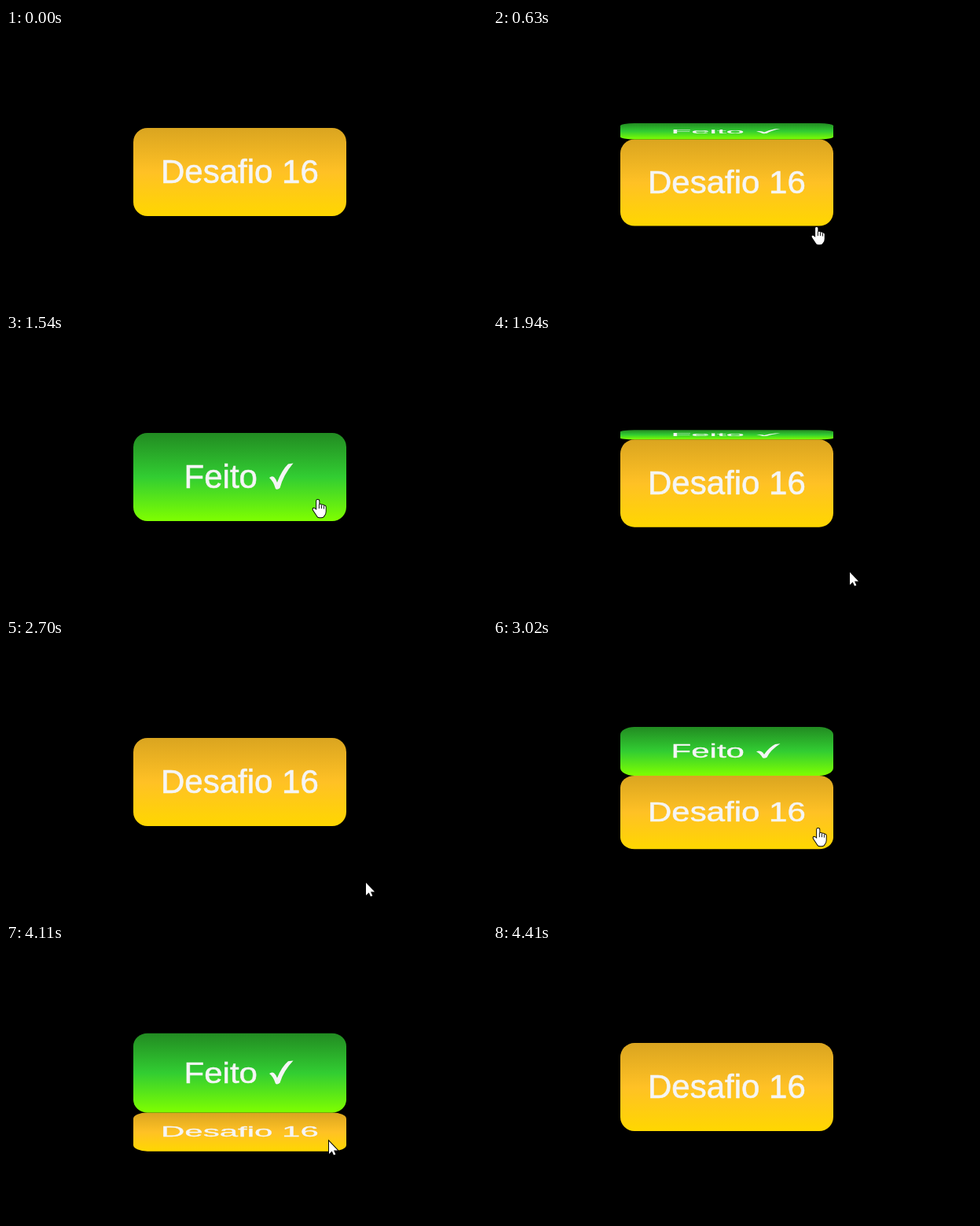
An HTML page with a canvas for the animation above (4.72 s loop, 612 by 352 pixels).

```html
<!DOCTYPE html>
<html lang="pt">
<head>
<meta charset="utf-8">
<title>Desafio 16</title>
<style>
  html, body { margin: 0; width: 100%; height: 100%; overflow: hidden; background: #000; }
  canvas { display: block; }
</style>
</head>
<body>
<canvas id="stage" width="612" height="352"></canvas>
<script>
const ctx = document.getElementById('stage').getContext('2d');
const LOOP = 4720;
const TICK = 77.1;          // screen refresh interval
const FIRST_TICK = 317;
const GLIDE = 470;          // duration of one pointer movement
const TURN = 400;           // duration of one flip
const PIVOT = 20;           // offset between the cube's centre and its rotation axis
const CENTER = { x: 297.5, y: 183 };
const FACE = { w: 271, h: 112, r: 18 };

// Each pointer movement ends at x, y and flips the button on its way
const MOVES = [
  { at: 320, x: 396, y: 211, flip: 580, hover: true },
  { at: 1540, x: 458, y: 311, flip: 1664, hover: false },
  { at: 2700, x: 398, y: 217, flip: 2922, hover: true },
  { at: 3940, x: 449, y: 356, flip: 4016, hover: false }
];

const FRONT = { label: 'Desafio 16', left: 197, colors: ['#daa520', '#ffc125', '#ffd700'] };
const TOP = { label: 'Feito', left: 226.6, colors: ['#228b22', '#32cd32', '#7fff00'], checked: true };

const CHECK = new Path2D(
  'M335 184Q338 181 341 183Q344 186 345 190Q351 174 359 166.5L365.5 165.5' +
  'Q353 180 348.5 197Q345 200 343 198Q340 188 335 184Z');
const ARROW = new Path2D('M0 0V16L3.7 12.5L6 17.5L8.3 16.5L6 11.5H11Z');
const HAND = new Path2D(
  'M-1.5 1.5Q-1.5 0 0 0Q2 0 2 1.5V6.5Q4.5 5.5 5.3 7.3Q7.7 6.3 8.5 8.2' +
  'Q11 7.6 11 10V16Q11 19 9 21.5Q8 24 5 24H2.5Q0 24 -1 21.5L-6 14' +
  'Q-7 12 -5.5 11.5Q-4 11.3 -1.5 14Z');
const KNUCKLES = new Path2D('M2 6V12M5.3 7.5V12M8.5 8.5V12.5');

const clamp = x => Math.max(0, Math.min(1, x));
const smooth = x => x * x * (3 - 2 * x);
const mix = (a, b, k) => a + (b - a) * k;

function bezier(u, p1, p2) {
  const v = 1 - u;
  return 3 * v * v * u * p1 + 3 * v * u * u * p2 + u * u * u;
}

// CSS "ease"
function ease(x) {
  let lo = 0, hi = 1;
  for (let i = 0; i < 24; i++) {
    const mid = (lo + hi) / 2;
    if (bezier(mid, 0.25, 0.25) < x) lo = mid; else hi = mid;
  }
  return bezier(lo, 0.1, 1);
}

function lastFlip(t) {
  return MOVES.filter(move => move.flip <= t).pop() || MOVES[MOVES.length - 1];
}

function angleAt(t) {
  const { flip, hover } = lastFlip(t);
  const done = t < flip ? 1 : ease(clamp((t - flip) / TURN));
  return (hover ? done : 1 - done) * Math.PI / 2;
}

function pointerAt(t) {
  let { x, y } = MOVES[MOVES.length - 1];
  for (const move of MOVES) {
    const k = smooth(clamp((t - move.at) / GLIDE));
    x = mix(x, move.x, k);
    y = mix(y, move.y, k);
  }
  return { x: Math.round(x), y: Math.round(y) };
}

function drawFace(face, centerY, scale) {
  if (scale < 0.002) return;
  const { w, h, r } = FACE;
  ctx.save();
  ctx.translate(0, centerY);
  ctx.scale(1, scale);
  const fill = ctx.createLinearGradient(0, -h / 2, 0, h / 2);
  face.colors.forEach((color, i) => fill.addColorStop(i / 2, color));
  ctx.fillStyle = fill;
  ctx.beginPath();
  ctx.roundRect(CENTER.x - w / 2, -h / 2, w, h, r);
  ctx.fill();

  ctx.fillStyle = ctx.strokeStyle = '#f5f5f5';
  ctx.lineWidth = 0.6;
  ctx.font = '42px "Liberation Sans", Arial, sans-serif';
  ctx.fillText(face.label, face.left, 14);
  ctx.strokeText(face.label, face.left, 14);
  if (face.checked) {
    ctx.translate(0, -CENTER.y);
    ctx.fill(CHECK);
  }
  ctx.restore();
}

function drawCube(angle) {
  const c = Math.cos(angle), s = Math.sin(angle);
  const y = CENTER.y + PIVOT * (c + s - 1);
  drawFace(FRONT, y + FACE.h / 2 * s, c);
  drawFace(TOP, y - FACE.h / 2 * c, s);
}

function drawPointer(t) {
  const { x, y } = pointerAt(t);
  const hand = lastFlip(t).hover;
  const shape = hand ? HAND : ARROW;
  ctx.save();
  ctx.translate(x, y);
  if (hand) {
    ctx.translate(0.5, 1);
    ctx.scale(0.93, 0.93);
  }
  ctx.fillStyle = '#fff';
  ctx.strokeStyle = '#000';
  ctx.lineWidth = 2;
  ctx.stroke(shape);
  ctx.fill(shape);
  if (hand) {
    ctx.lineWidth = 1;
    ctx.stroke(KNUCKLES);
  }
  ctx.restore();
}

function draw(time) {
  const t = FIRST_TICK + TICK * Math.floor((time - FIRST_TICK) / TICK);
  ctx.fillStyle = '#000';
  ctx.fillRect(0, 0, 612, 352);
  drawCube(angleAt(t));
  drawPointer(t);
}

const start = performance.now();
function loop() {
  draw((performance.now() - start) % LOOP);
  requestAnimationFrame(loop);
}
loop();
</script>
</body>
</html>
```
